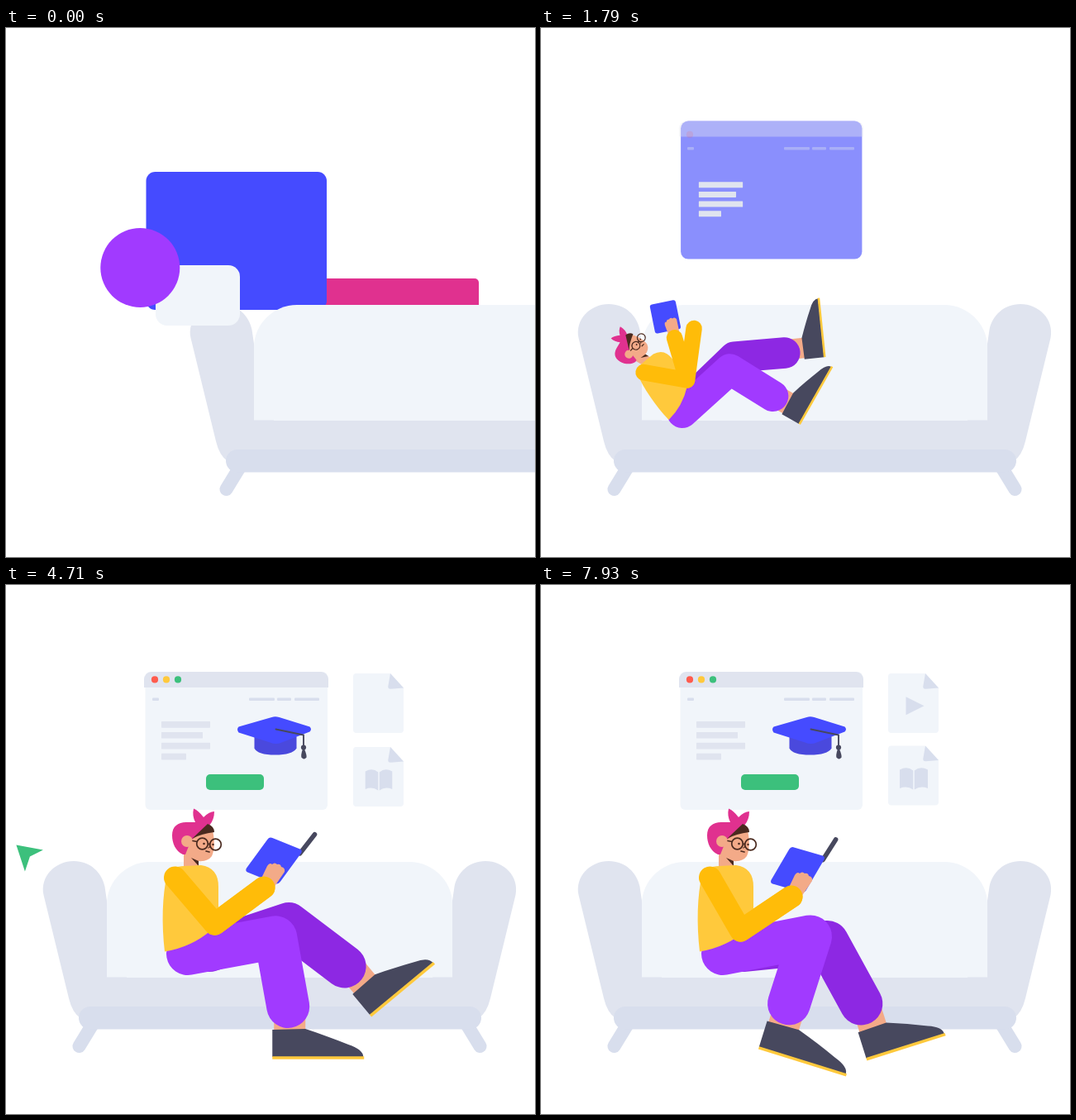
Animation of 640 by 640 pixels, one loop 8000 ms. Source, as an HTML page with a canvas:

```html
<!DOCTYPE html>
<html lang="en">
<head>
<meta charset="utf-8">
<title>Reading on the sofa</title>
<style>
html, body { margin: 0; width: 100%; height: 100%; overflow: hidden; background: #fff; }
canvas { display: block; width: 100vw; height: 100vh; }
</style>
</head>
<body>
<canvas id="stage"></canvas>
<script>
const LOOP = 8000;
const canvas = document.getElementById('stage');
const ctx = canvas.getContext('2d');
const density = Math.max(1, window.devicePixelRatio || 1);
canvas.width = canvas.height = 640 * density;

const BLUE = '#454bff', PURPLE = '#a13aff', PLUM = '#8d28e3', PINK = '#e0318f';
const YELLOW = '#ffc93c', AMBER = '#ffbc09', SKIN = '#f3aa88', BROWN = '#4a2a1f';
const INK = '#47485e', PALE = '#f1f5fa', GREY = '#e0e4ef', MIST = '#d8deed', GREEN = '#3cc07c';

// Timing: each helper maps the time to a progress between start and end.
const clamp = v => Math.max(0, Math.min(1, v));
const span = (t, start, end) => clamp((t - start) / (end - start));
const bump = (t, start, end) => Math.sin(Math.PI * span(t, start, end));
function ease(t, start, end) {
  const u = span(t, start, end);
  return u < .5 ? 4 * u ** 3 : 1 - 4 * (1 - u) ** 3;
}
function pop(t, start, end, bounce = 1.7) {
  const u = span(t, start, end) - 1;
  return Math.max(0, 1 + (bounce + 1) * u ** 3 + bounce * u ** 2);
}

const mix = (a, b, p) => Array.isArray(a) ? a.map((v, i) => mix(v, b[i], p)) : a + (b - a) * p;
const add = (a, b) => a.map((v, i) => v + b[i]);
const rad = deg => deg * Math.PI / 180;
const polar = (from, length, deg) =>
  add(from, [length * Math.cos(rad(deg)), length * Math.sin(rad(deg))]);
function blend(from, to, p) {
  const channels = hex => [1, 3, 5].map(i => parseInt(hex.slice(i, i + 2), 16));
  return `rgb(${mix(channels(from), channels(to), p).map(Math.round)})`;
}

function at([x, y], angle, scale, draw) {
  ctx.save();
  ctx.translate(x, y);
  ctx.rotate(rad(angle));
  ctx.scale(scale, scale);
  draw();
  ctx.restore();
}
function mirrored(x, draw) {
  [1, -1].forEach(side => {
    ctx.save();
    ctx.translate(x, 0);
    ctx.scale(side, 1);
    draw();
    ctx.restore();
  });
}
function fade(alpha, draw) {
  if (alpha <= 0) return;
  ctx.save();
  ctx.globalAlpha *= alpha;
  draw();
  ctx.restore();
}
function shape(d, color) {
  ctx.fillStyle = color;
  ctx.fill(new Path2D(d));
}
function box(x, y, w, h, r, color) {
  if (w <= 0 || h <= 0) return;
  ctx.beginPath();
  ctx.roundRect(x, y, w, h, r);
  ctx.fillStyle = color;
  ctx.fill();
}
function disc(x, y, r, color) {
  ctx.beginPath();
  ctx.arc(x, y, r, 0, 2 * Math.PI);
  ctx.fillStyle = color;
  ctx.fill();
}
function line(points, width, color, cap = 'round') {
  ctx.beginPath();
  points.forEach(p => ctx.lineTo(...p));
  ctx.lineWidth = width;
  ctx.lineCap = cap;
  ctx.lineJoin = 'round';
  ctx.strokeStyle = color;
  ctx.stroke();
}

// Where the scene stands in each of its overlapping movements.
const phasesAt = t => ({
  drop: ease(t, 70, 730),
  gather: ease(t, 870, 1200),
  lift: ease(t, 860, 1430),
  open: ease(t, 1480, 2150),
  rise: ease(t, 1640, 2360),
  settle: ease(t, 2150, 2600),
  kick: ease(t, 4820, 6200),
  lower: ease(t, 5150, 6200),
  step: ease(t, 6600, 8000),
});

function drawCap() {
  shape('M-24 9 V23 Q-20 31 1 31 Q22 31 27 23 V9Z', '#4a49dd');
  shape('M-43 -3 L-3 -14.4 Q1 -16 6 -14.4 L43 -3 Q46 0 43 3 L9 16 Q2 19 -5 16 L-43 4 Q-46 0 -43 -3Z', BLUE);
  line([[2, 0], [35.5, 7], [35.5, 22]], 1.9, INK);
  disc(35.5, 22, 3.1, INK);
  shape('M34.5 24 H36.5 Q39.5 31 39 34 Q36 38 33 34 Q32 31 34.5 24Z', INK);
}

function drawWindow(t, { drop, lift, open, settle }) {
  const top = 174 + 31 * drop - 86 * lift - 16 * open + 2 * settle;
  box(169.5 - open, top, 218.5 + 2 * open, 167, 11 - 5 * open, blend(BLUE, PALE, open));
  fade(open, () => {
    box(167, top, 223, 19, [9, 9, 0, 0], GREY);
    [[177, 8], [294, 31], [328, 17], [349, 30]].forEach(([x, w]) => box(x, top + 31.5, w, 3.5, 1, MIST));
  });

  ['#ff5b4d', YELLOW, GREEN].forEach((color, i) => {
    const start = 1700 + 180 * i;
    fade(span(t, start, start + 600), () => disc(180 + 14 * i, top + 21 - 11.6 * open, 4.1, color));
  });

  const grown = .7 * open + .3 * settle;
  at([192 - 4 * grown, top + 79 - 19 * grown], 0, mix(.865, 1, grown) * ease(t, 1150, 1430), () =>
    [59, 50, 59, 30].forEach((w, i) => box(0, 12.9 * i, w, 7.7, .6, GREY)));

  at([324.5, top + 58 + 11.5 * settle], 0, pop(t, 1857, 2600, 3.7), drawCap);

  const button = pop(t, 2160, 2560);
  const press = 1 - .08 * bump(t, 5280, 5480);
  at([277, top + 133.5 + 10 * (1 - button)], 0, button * press, () => box(-35, -9.5, 70, 19, 5, GREEN));
}

function drawDoc(center, angle, scale, icon) {
  at(center, angle, scale, () => {
    shape('M-27 -36 H14.5 L30.5 -18.5 V32 Q30.5 36 26.5 36 H-26.5 Q-30.5 36 -30.5 32 V-32 Q-30.5 -36 -27 -36Z', PALE);
    shape('M14.5 -36 L30.5 -18.5 L15 -17.2 Q11.5 -17 11.8 -20.5Z', MIST);
    icon();
  });
}

function drawDocs(t) {
  drawDoc([450.5, 143], 3 * bump(t, 5960, 6460), pop(t, 2700, 3250), () =>
    at([0, 3.3], 0, pop(t, 5960, 6460, 2.8), () => shape('M-9 -11 L13 0 L-9 11Z', MIST)));

  const slide = 45 * (1 - ease(t, 3500, 4150));
  drawDoc([450.5 + slide, 232 - 1.5 * ease(t, 7550, 7930)], 0, pop(t, 3500, 4150), () =>
    at([.5, 4], 0, pop(t, 4572, 5172, 3), () =>
      mirrored(0, () => shape('M.8 -10 Q8 -16 17 -11 V11.5 Q8 8 .8 13Z', MIST))));
}

function drawSofa(t) {
  at([178 * (1 - ease(t, 404, 1537)), 0], 0, 1, () => {
    shape('M122 476 V386 C122 358 146 335 174 335 H488 C516 335 540 358 540 386 V476Z', PALE);
    mirrored(331, () => {
      line([[-226, 531], [-242.5, 558]], 16, MIST);
      shape('M-285.5 375 C-290 352 -271 334 -249 334 C-229 334 -215 348 -211.5 365 L-209 382 V474.5 H-185 V524 H-241 Q-251 517 -255 500Z', GREY);
    });
    box(100, 475, 462, 40, 0, GREY);
    box(88, 510, 487, 27.5, 14, MIST);
  });
}

function drawShoe() {
  shape('M2 -28 H40 V1 H2Z', SKIN);
  shape('M0 0 L40 -1 C58 5 75 11 92 18 Q110 24 110 33 H0Z', INK);
  line([[0, 34], [111, 34]], 3.6, YELLOW, 'butt');
}

function drawLeg(leg, [thigh, shin, foot], scale) {
  const knee = polar(leg.hip, leg.thigh * scale, thigh);
  const ankle = polar(knee, 85 * scale, shin);
  at(ankle, foot, scale, () => {
    ctx.translate(...leg.heel);
    ctx.scale(leg.stretch, 1);
    drawShoe();
  });
  line([leg.hip, knee, ankle], 52 * scale, leg.color);
}

function drawHead() {
  shape('M-4 5 L6 -4 L31 -13 C34 0 33 12 30 18 Q25 25 14 24 V34 H-4Z', SKIN);
  shape('M5 20 L14 24 V30Z', BROWN);
  shape('M-5 16 C-14 12 -18 2 -18 -7 C-18 -18 -11 -23 -1 -23 H10 Q6 -31 8 -39.5 Q14 -37 20 -29 Q27 -36 33 -36 Q33 -26 27 -19 L7 -3 L2 6 L-2 16Z', PINK);
  shape('M6 -3 L25 -21 Q33 -18 33 -11 Q17 -9 6 -3Z', BROWN);
  disc(0, 0, 7, SKIN);
  ctx.strokeStyle = BROWN;
  ctx.lineWidth = 1.7;
  ctx.lineCap = 'round';
  ctx.stroke(new Path2D('M25.3 3 a6.8 6.8 0 1 0 -13.6 0 a6.8 6.8 0 1 0 13.6 0 M41.3 4 a6.8 6.8 0 1 0 -13.6 0 a6.8 6.8 0 1 0 13.6 0 M7 -.5 L12 .5 M25 3 L28 3.5 M23 12 L27 13'));
  disc(20.5, 3, 1.3, BROWN);
  disc(31.5, 4, 1.2, BROWN);
  line([[27, 4], [27.5, 7.5], [25.5, 8]], 1, BROWN);
}

function drawTablet(skew, pen) {
  if (pen > 0) line([[26, -20], [28 + 6 * pen, -24 - 24 * pen]], 5.6, INK);
  ctx.transform(1, 0, -.25 * skew, 1, 0, 0);
  box(-22, -24.8, 44, 49.6, 4, BLUE);
}

// Elbow of an arm whose two halves are equally long.
function elbowOf(shoulder, wrist, length) {
  const [dx, dy] = [wrist[0] - shoulder[0], wrist[1] - shoulder[1]];
  const reach = Math.hypot(dx, dy);
  const bend = Math.sqrt(Math.max(0, length ** 2 - reach ** 2 / 4)) / reach;
  return add(mix(shoulder, wrist, .5), [-dy * bend, dx * bend]);
}

function drawReader(t, { rise, settle, kick, lower, step }) {
  const sitUp = (lying, sitting) => mix(lying, sitting, rise);
  const scale = sitUp(.71, 1);

  // Angles of thigh, shin and foot.
  const frontAngles = mix(sitUp([-43.4, 30, -62.8], [-10.5, 79.8, 0]), [-11, 107.8, 17.3], kick);
  const backAngles = mix(sitUp([-45, -6.4, -98], [-18.4, 37.1, -39.7]), [-5.7, 61.3, -17.5], step);
  drawLeg({ hip: sitUp([179, 449], [246, 442]), thigh: 101, heel: [-14, 32], stretch: .9, color: PLUM }, backAngles, scale);
  drawLeg({ hip: sitUp([169, 466], [220, 446]), thigh: 108, heel: [-19, 28], stretch: 1, color: PURPLE }, frontAngles, scale);

  const raised = sitUp([156, 376], [305, 343]);
  const wrist = mix(mix(raised, [312, 366], settle), [303, 377], lower);
  const shoulder = sitUp([121, 419], [204.5, 354]);
  const elbow = elbowOf(shoulder, wrist, 74 * scale);
  const farWrist = sitUp([186, 363], wrist);
  line([elbow, farWrist], 27 * scale, AMBER);

  at(sitUp([102, 398], [219, 310]), sitUp(-62, 0), scale, drawHead);
  at(sitUp([153, 475], [192, 443]), sitUp(-37.5, 0), scale, () =>
    shape('M0 0.5 C-4 -33 -3 -68 3 -93 Q8 -103 24 -103 L44 -104 Q65 -101 65 -78 V-40 L57 -26 Q33 -5 0 0.5Z', YELLOW));

  at([280.5, 309], 0, bump(t, 1980, 2440), () => box(-7.5, -16, 15, 32, 7, GREEN));
  const grip = add(sitUp([-12, -25], [12, -35]), [-4.5 * lower, 2.5 * settle]);
  const tilt = sitUp(-13, 29) - 7 * settle - 5.7 * lower;
  at(add(wrist, grip), tilt, scale, () => drawTablet(settle, ease(t, 2640, 3300)));
  at(wrist, sitUp(-48, 0), scale, () =>
    shape('M-6 -5 L4 -26 Q7 -31 10 -28 Q13 -31 16 -28 Q20 -29 21 -25 Q26 -24 25 -19 L12 0Z', SKIN));
  line([shoulder, elbow, wrist], 27 * scale, AMBER);
}

// Loose shapes that gather into the reader.
function drawPieces(t, { drop, gather }) {
  const [x, y, w, h, angle] = mix(mix([232, 323.5, 102, 73, 0], [267, 539, 107, 150, -6.5], drop), [146, 435, 40, 66, -37], gather);
  const [cx, cy, r] = mix(mix([162.3, 290, 48], [162.5, 488.5, 71.5], drop), [200, 440, 20], gather);
  at([x, y], angle, 1, () => box(-w / 2, -h / 2, w, h, 14, blend(PALE, '#f7da19', drop)));
  disc(cx, cy, r, PURPLE);
}

function drawCursor(t) {
  const tip = mix([-40, 329], [284, 239], ease(t, 4400, 5306));
  const size = 1 - .15 * bump(t, 5280, 5400) - ease(t, 5400, 5600);
  at(tip, 0, Math.max(0, size), () => shape('M0 0 L32.5 6 L16.5 14 L10.5 32Z', GREEN));
}

function render(t) {
  const phases = phasesAt(t);
  ctx.setTransform(density, 0, 0, density, 0, 0);
  ctx.fillStyle = '#fff';
  ctx.fillRect(0, 0, 640, 640);
  box(330, 303, 242 - 272 * ease(t, 354, 1200), 38, 5, PINK);
  drawWindow(t, phases);
  drawDocs(t);
  drawSofa(t);
  if (t < 1200) drawPieces(t, phases);
  fade(span(t, 1080, 1200), () => drawReader(t, phases));
  drawCursor(t);
}

const start = performance.now();
function tick() {
  render((performance.now() - start) % LOOP);
  requestAnimationFrame(tick);
}
tick();
</script>
</body>
</html>
```
